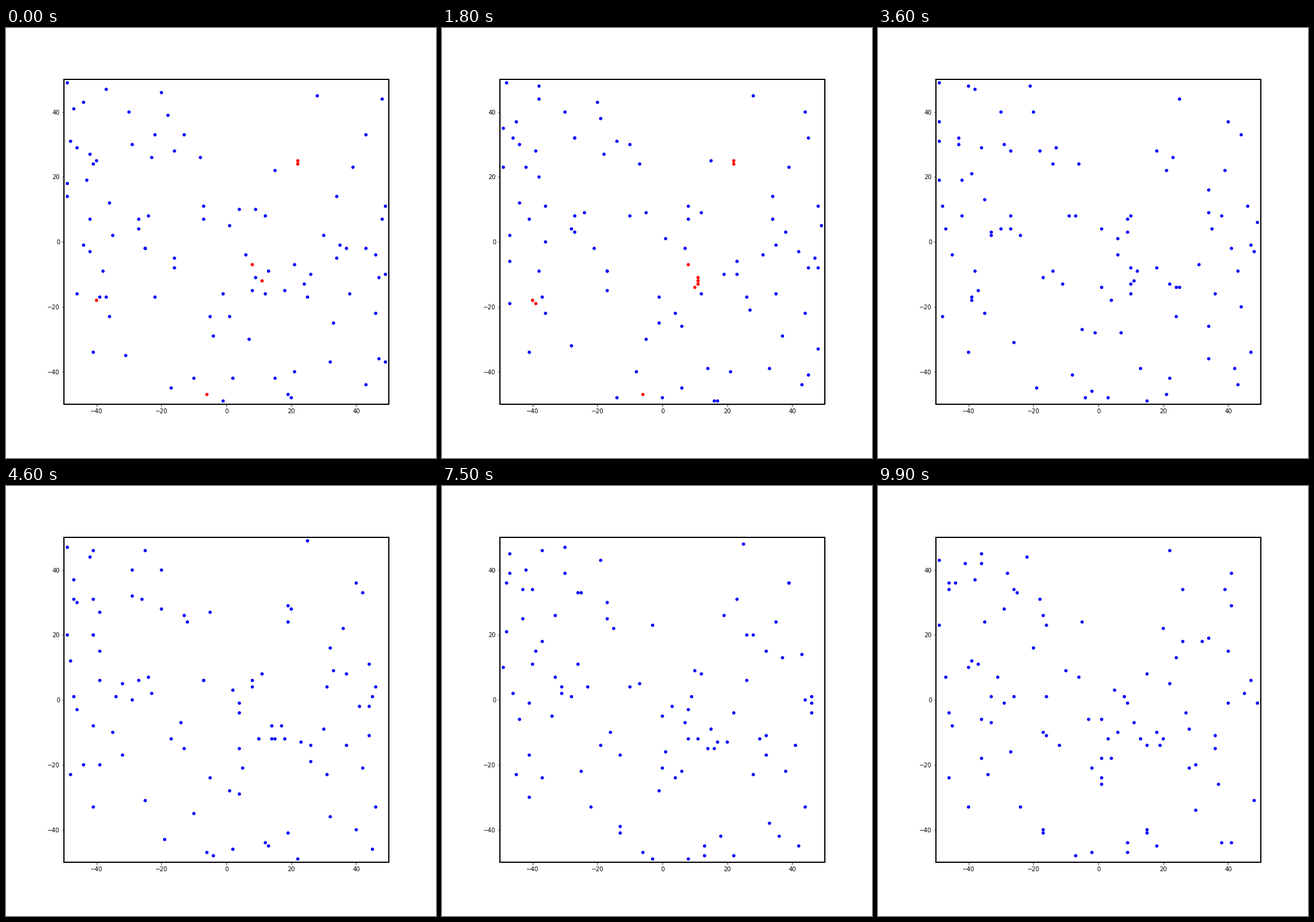
Write a matplotlib script that moves like this. It is 720 by 720 pixels and loops after 10000 ms.

```python
import numpy as np
import matplotlib.pyplot as plt
from matplotlib.animation import FuncAnimation

SIDE, FRAMES, LIMIT = 720, 100, 49
BOX, LEFT, BOTTOM = 543.53, 97.24, 90.07

# Infected spots: x, y and the step at which the dot falls ill there.
SPOTS = np.array([(22, 25, 0), (22, 24, 0), (8, -7, 0), (11, -12, 0),
                  (-40, -18, 0), (-6, -47, 0), (11, -11, 3), (11, -13, 6),
                  (10, -14, 9), (-39, -19, 12)])

# Healthy dots per quadrant: sign of x, sign of y, count.
QUADRANTS = [(-1, 1, 29), (1, 1, 13), (-1, -1, 19), (1, -1, 28)]
RESTING = 10

# Each step goes to one of the four neighbours or stays.
MOVES = np.array([(0, 0), (1, 0), (-1, 0), (0, 1), (0, -1)])

rng = np.random.default_rng(11)


def scatter_healthy():
    groups = [rng.integers(1, LIMIT + 1, (count, 2)) * (sx, sy)
              for sx, sy, count in QUADRANTS]
    return rng.permutation(np.concatenate(groups))


def build_walk():
    """Return positions and infection flags for every step."""
    healthy = scatter_healthy()
    calm, spots = len(healthy), SPOTS[:, :2]
    goal = np.concatenate([healthy, spots])
    n = len(goal)

    arrive = np.zeros(n, int)
    arrive[calm:] = SPOTS[:, 2]
    release = np.zeros(n, int)
    release[:RESTING] = np.linspace(24, 38, RESTING)
    release[calm:] = np.linspace(25, 33, n - calm)

    # Dots that fall ill later start a little way from their spot.
    pos = goal + rng.integers(-2, 3, goal.shape) * (arrive > 0)[:, None]
    path, sick = [], []
    for k in range(FRAMES):
        if k:
            step = MOVES[rng.integers(len(MOVES), size=n)]
            pos = np.clip(pos + step, -LIMIT, LIMIT)
            # Stay within reach of the goal, then hold it until release.
            reach = np.maximum(arrive - k, 0)[:, None]
            held = (k <= release)[:, None]
            pos = np.where(held, np.clip(pos, goal - reach, goal + reach), pos)
        path.append(pos)
        sick.append((np.arange(n) >= calm) & (arrive <= k) & (k < release))
    return path, sick


path, sick = build_walk()

fig = plt.figure(figsize=(10, 10), dpi=72, facecolor="white")
ax = fig.add_axes([LEFT / SIDE, BOTTOM / SIDE, BOX / SIDE, BOX / SIDE])
ticks = range(-40, 41, 20)
ax.set(xlim=(-50, 50), ylim=(-50, 50), xticks=ticks, yticks=ticks)
for spine in ax.spines.values():
    spine.set_linewidth(2)

dots = ax.scatter(*path[0].T, s=20, c="blue", linewidths=1, zorder=2)


def draw(k):
    colors = np.where(sick[k], "red", "blue")
    dots.set_offsets(path[k])
    dots.set_facecolor(colors)
    dots.set_edgecolor(colors)
    return (dots,)


anim = FuncAnimation(fig, draw, frames=FRAMES, init_func=lambda: draw(0),
                     interval=100, repeat=True, repeat_delay=0, blit=False)
plt.show()
```
